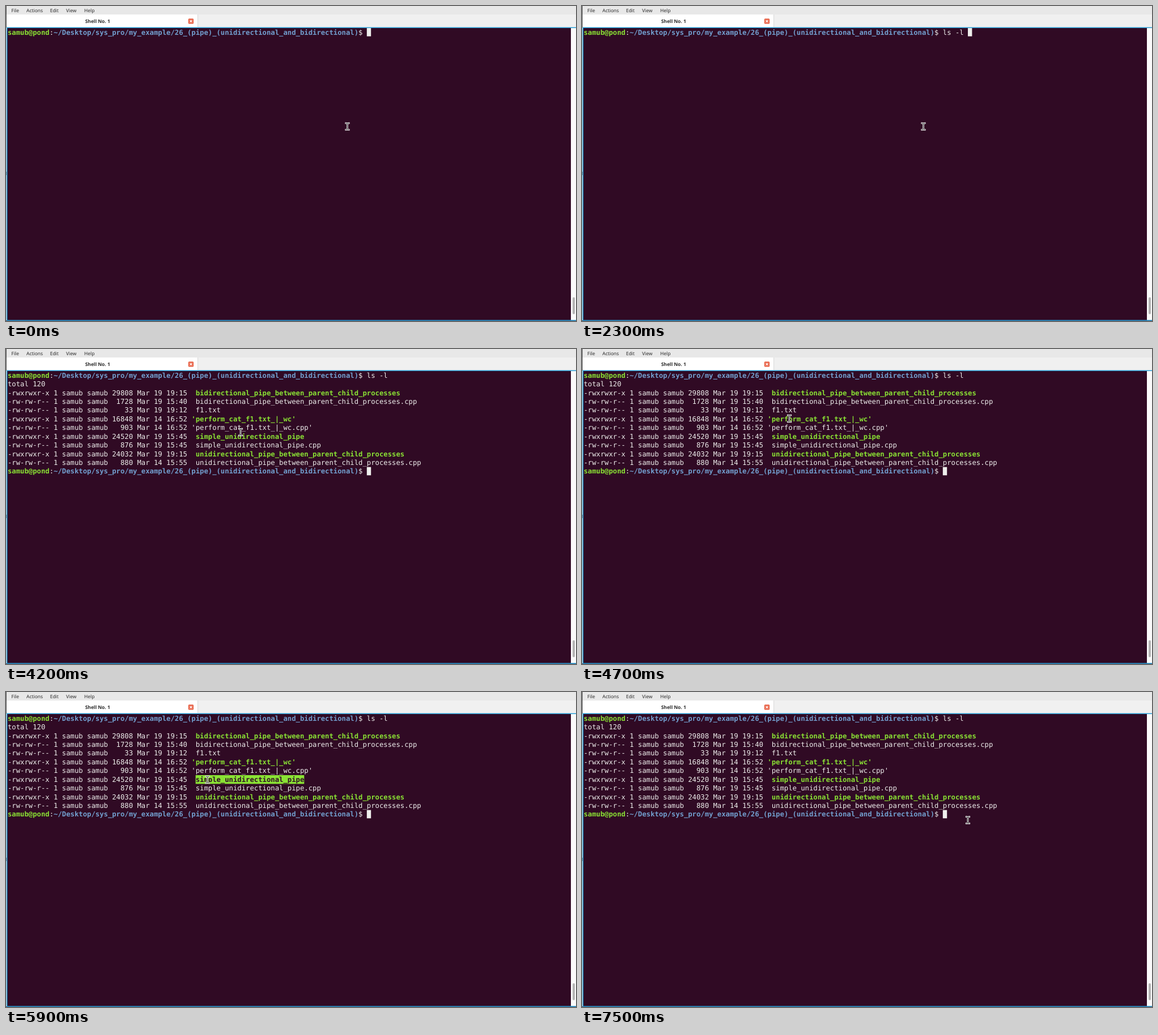
Write an HTML page with a canvas that moves like this. It is 1006 by 557 pixels and loops after 8 s.

```html
<!DOCTYPE html>
<html lang="en">
<head>
<meta charset="utf-8">
<title>Shell</title>
<style>
  html, body { margin: 0; width: 100%; height: 100%; overflow: hidden; background: #300a24; }
  canvas { display: block; }
</style>
</head>
<body>
<canvas id="stage" width="1006" height="557"></canvas>
<script>
const ctx = document.getElementById('stage').getContext('2d');
const LOOP = 8000;
const LEFT = 3, TOP = 39, CELL = 7.37, ROW = 15.43, BASELINE = 11.7;
const MONO = '12.24px "DejaVu Sans Mono", monospace';
const UI = '8.45px "Noto Sans", sans-serif';
const BG = '#300a24', FG = '#eeeeec', GREEN = '#8ae234', BLUE = '#729fcf';

const USER = 'samub', HOST = 'pond';
const PATH = '~/Desktop/sys_pro/my_example/26_(pipe)_(unidirectional_and_bidirectional)';
const PROMPT_COLS = (USER + '@' + HOST + ':' + PATH + '$ ').length;
const NAME_COL = 45;

// [size, date, name]; programs come without an extension
const FILES = [
  [29808, 'Mar 19 19:15', 'bidirectional_pipe_between_parent_child_processes'],
  [1728, 'Mar 19 15:40', 'bidirectional_pipe_between_parent_child_processes.cpp'],
  [33, 'Mar 19 19:12', 'f1.txt'],
  [16848, 'Mar 14 16:52', "'perform_cat_f1.txt_|_wc'"],
  [903, 'Mar 14 16:52', "'perform_cat_f1.txt_|_wc.cpp'"],
  [24520, 'Mar 19 15:45', 'simple_unidirectional_pipe'],
  [876, 'Mar 19 15:45', 'simple_unidirectional_pipe.cpp'],
  [24032, 'Mar 19 19:15', 'unidirectional_pipe_between_parent_child_processes'],
  [880, 'Mar 14 15:55', 'unidirectional_pipe_between_parent_child_processes.cpp']
];

const COMMAND = 'ls -l ';
const KEY_TIMES = [600, 1300, 1400, 1900, 2200, 2300];
const LIST_TIME = 2600;
const SELECT = { from: 5900, to: 6600, file: 5 };

// Pointer moves: start time, then one position per 100 ms
const MOVES = [
  [0, [602.5, 213]],
  [3600, [607, 211], [600, 207], [573, 198], [532, 184], [486, 169], [444, 156],
         [414, 147], [397, 119], [387, 96]],
  [4500, [378, 89], [370, 105], [366, 123], [362, 138], [359, 151], [357, 161],
         [356, 168], [355.5, 171]],
  [5500, [355.5, 163], [355.5, 155]],
  [6100, [385, 164], [505, 200], [635, 227.5], [680.5, 226.5]],
  [7300, [681.5, 226], [681.3, 226.3], [681, 226.5]]
];

function pointerAt(t) {
  const [start, ...points] = MOVES.filter(m => m[0] <= t).pop();
  return points[Math.min(points.length - 1, Math.floor((t - start) / 100))];
}

function rect(x, y, w, h, color) {
  ctx.fillStyle = color;
  ctx.fillRect(x, y, w, h);
}

function write(row, col, text, color, bold) {
  ctx.font = (bold ? 'bold ' : '') + MONO;
  ctx.fillStyle = color;
  [...text].forEach((ch, i) => {
    if (ch !== ' ') ctx.fillText(ch, LEFT + (col + i) * CELL, TOP + row * ROW + BASELINE);
  });
}

function prompt(row, typed, withCursor) {
  const login = USER + '@' + HOST;
  write(row, 0, login, GREEN, true);
  write(row, login.length, ':', FG);
  write(row, login.length + 1, PATH, BLUE, true);
  write(row, PROMPT_COLS - 2, '$ ' + typed, FG);
  if (withCursor) {
    rect(LEFT + (PROMPT_COLS + typed.length) * CELL, TOP + row * ROW, CELL, 14.6, FG);
  }
}

function listing(selected) {
  write(1, 0, 'total 120', FG);
  FILES.forEach(([size, date, name], i) => {
    const row = i + 2;
    const program = !/\.(cpp|txt)'?$/.test(name);
    const mode = program ? '-rwxrwxr-x' : '-rw-rw-r--';
    write(row, 0, `${mode} 1 ${USER} ${USER} ${String(size).padStart(5)} ${date}`, FG);
    const marked = selected === i;
    if (marked) rect(LEFT + NAME_COL * CELL, TOP + row * ROW, name.length * CELL, ROW, GREEN);
    const col = name[0] === "'" ? NAME_COL - 1 : NAME_COL;
    write(row, col, name, marked ? BG : program ? GREEN : FG, program);
  });
}

function label(text, x, y, weight, align) {
  ctx.font = weight + ' ' + UI;
  ctx.textAlign = align;
  ctx.fillStyle = '#2b2b2b';
  ctx.fillText(text, x, y);
  ctx.textAlign = 'left';
}

function windowFrame() {
  rect(0, 0, 1006, 557, BG);
  rect(0, 0, 1006, 15, '#e8e8e8');
  rect(0, 15, 1006, 23, '#f0f0f0');
  rect(1, 15, 337, 23, '#ffffff');
  rect(338, 15, 1, 22, '#d8d8d8');
  rect(0, 0, 1, 38, '#555555');
  const menu = [['File', 9.5], ['Actions', 36], ['Edit', 77.7], ['View', 106], ['Help', 138]];
  menu.forEach(([text, x]) => label(text, x, 11.2, 'normal', 'left'));
  label('Shell No. 1', 161.7, 30.2, 'bold', 'center');

  ctx.fillStyle = '#e9664b';
  ctx.beginPath();
  ctx.roundRect(321.7, 22.2, 9.4, 9.4, 1.5);
  ctx.fill();
  ctx.strokeStyle = '#ffffff';
  ctx.lineWidth = 1.3;
  ctx.beginPath();
  ctx.moveTo(324.4, 24.9); ctx.lineTo(328.4, 28.9);
  ctx.moveTo(328.4, 24.9); ctx.lineTo(324.4, 28.9);
  ctx.stroke();

  rect(997, 39, 9, 517, '#fafafa');
  ctx.fillStyle = '#b4b4b4';
  ctx.beginPath();
  ctx.roundRect(1000, 515, 4, 30, 2);
  ctx.fill();

  rect(0, 38, 1, 518, '#d8d8d8');
  rect(0, 293, 1, 6, '#888888');
  const edge = '#2a9fd6';
  rect(1, 37.5, 1005, 1.5, edge);
  rect(1, 38, 1.5, 518, edge);
  rect(1, 555.2, 1005, 1.5, edge);
}

function pointer([x, y]) {
  const beam = new Path2D();
  beam.moveTo(x - 2.7, y - 5.8);
  beam.quadraticCurveTo(x, y - 5.8, x, y - 4.4);
  beam.quadraticCurveTo(x, y - 5.8, x + 2.7, y - 5.8);
  beam.moveTo(x, y - 4.8);
  beam.lineTo(x, y + 4.8);
  beam.moveTo(x - 2.7, y + 5.8);
  beam.quadraticCurveTo(x, y + 5.8, x, y + 4.4);
  beam.quadraticCurveTo(x, y + 5.8, x + 2.7, y + 5.8);
  ctx.lineCap = 'square';
  ctx.lineWidth = 2.7;
  ctx.strokeStyle = '#ffffff';
  ctx.stroke(beam);
  ctx.lineWidth = 0.9;
  ctx.strokeStyle = '#111111';
  ctx.stroke(beam);
  ctx.lineCap = 'butt';
}

function draw(t) {
  ctx.textRendering = 'geometricPrecision';
  windowFrame();
  const listed = t >= LIST_TIME;
  prompt(0, COMMAND.slice(0, KEY_TIMES.filter(k => k <= t).length), !listed);
  if (listed) {
    listing(t >= SELECT.from && t < SELECT.to ? SELECT.file : -1);
    prompt(FILES.length + 2, '', true);
  }
  pointer(pointerAt(t));
}

let start;
function tick(now) {
  start ??= now;
  draw((now - start) % LOOP);
  requestAnimationFrame(tick);
}
draw(0);
requestAnimationFrame(tick);
</script>
</body>
</html>
```
